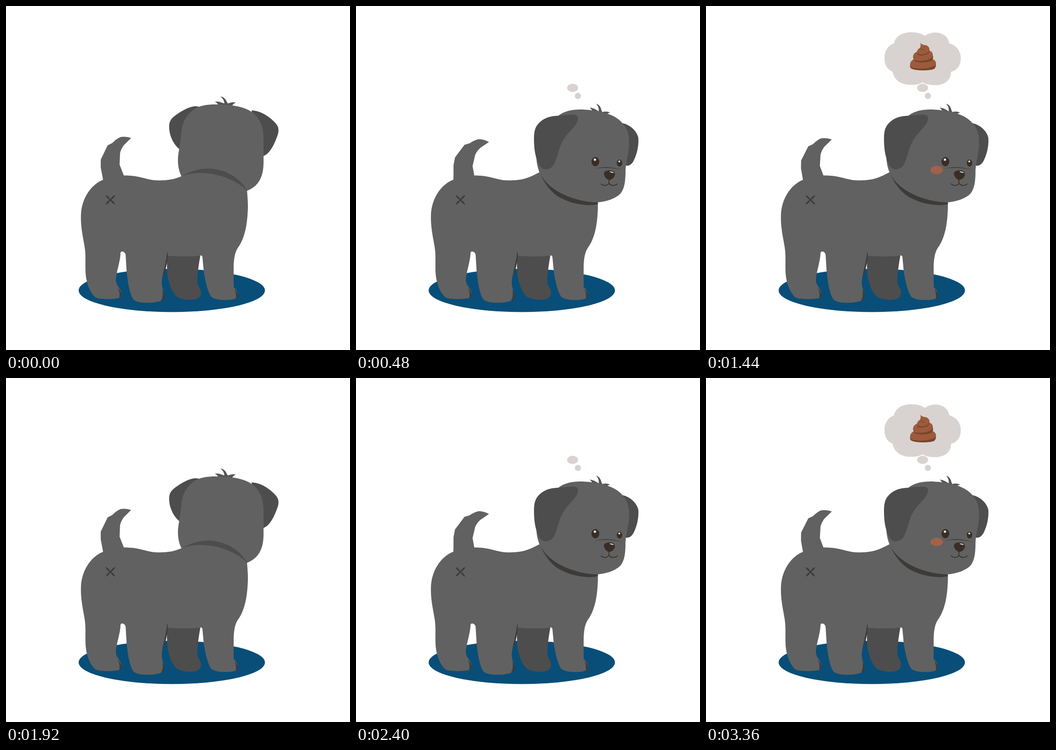
Write an HTML page that moves like this. It is 748x748 px and loops after 3840 ms.

```html
<!DOCTYPE html>
<html lang="en">
<head>
<meta charset="utf-8">
<title>Thinking puppy</title>
<style>
  html, body { margin: 0; width: 100%; height: 100%; overflow: hidden; background: #fff; }
  svg { display: block; width: 100vw; height: 100vh; }
  .fur { fill: #616161; }
  .dark { fill: #4d4d4d; }
  .deep { fill: #3d3b39; }
  .ink { fill: #382e26; }
  .cloud { fill: #d8d3d1; }
  .line { fill: none; stroke: #382e26; stroke-width: 1.7; stroke-linecap: round; }
</style>
</head>
<body>
<svg viewBox="0 0 748 748" xmlns="http://www.w3.org/2000/svg">
  <defs>
    <path id="hair" d="M454 208 Q462 207 469 210 L475 212 Q474 202 466 197 Q476 197 481 210 L483 212 Q491 208 500 210 Q494 212 491 218 L462 218 Q461 211 454 208Z"/>
    <path id="petal" d="M0 0 C-2 -6 -6 -9 -10.500 -10.500 C-9 -6 -6 -2 0 0Z"/>
  </defs>

  <ellipse cx="360.500" cy="618.500" rx="202.500" ry="47" fill="#084e78"/>

  <path id="tail" class="fur" d="M212 384 L210 372 L206 351 L206 334 L221 303 L231 298 Q241 288 249 285 Q261 283 272 287 L256 303 Q250 311 248 320 L247 345 L256 368 L258 390Z"/>

  <g id="backHead">
    <use href="#hair" fill="#555"/>
    <path class="dark" d="M419 219 C409 215 390 222 371 236 C356 246 354 254 355 267 C356 285 366 303 378 312 L400 270Z"/>
    <path class="dark" d="M534 227 C553 227 576 242 588 257 C595 266 593 276 588 288 C580 309 570 323 560 326 L540 280Z"/>
    <path class="fur" d="M382 371 C375 358 372 340 375 320 C379 300 380 286 382 268 C386 247 397 230 417 220 C435 213 459 213 489 216 C511 218 532 225 544 239 C556 253 560 269 560 291 L560 340 C560 372 549 392 524 402 L450 400Z"/>
    <path class="dark" d="M382 370 C407 356 430 352 449 354 C482 357 510 376 525 402 L440 390Z"/>
  </g>

  <path class="dark" d="M350 535 L424 535 C419 562 416 582 416 601 C416 608 423 612 424 621 C425 629 421 634 414 637 C402 641 383 638 373 633 C361 624 354 604 351 584 C350 567 349 552 350 535Z"/>
  <path class="deep" d="M351 526 C353 544 350 562 345 580 L339 592 L340 550Z"/>
  <path class="fur" d="M211 378 C232 368 257 367 280 370 C300 373 314 379 326 379 C345 380 364 378 382 370 C401 363 423 361 447 365 C478 370 503 382 524 401 C525 412 526 424 526 438 C525 474 520 504 504 526 C497 537 495 552 495 572 L495 611 C501 616 504 622 504 629 C503 636 497 638 486 639 C471 640 454 639 446 632 C438 620 433 597 430 577 L427 545 Q425 541 422 543 Q391 546 352 543 L351 527 C350 552 341 578 339 597 C337 611 344 618 344 630 C345 641 334 643 319 645 C302 646 284 645 277 638 C268 625 264 595 262 573 L260 540 Q258 535 254 534 Q250 533 249 537 C249 553 240 579 239 594 C238 606 247 612 250 620 C253 631 250 635 240 636 C225 638 204 638 195 634 C182 623 174 601 173 579 C172 561 174 542 171 524 C167 500 162 479 163 454 C164 421 183 389 211 378Z"/>
  <path class="deep" d="M243 613 Q252 621 251 630 Q249 635 246 635 Q249 624 243 613Z"/>
  <path class="deep" d="M340 616 Q347 630 344 636 Q341 640 337 641 Q343 631 340 616Z"/>
  <path class="deep" d="M497 615 Q505 624 504 630 Q504 635 500 637 Q501 626 497 615Z"/>
  <g id="star" class="deep" transform="translate(227 421.500)"></g>

  <g id="frontHead">
    <path class="fur" d="M376 373 L400 361 L416 385Z"/>
    <path class="deep" d="M398 358 L526 420 L526 431 C500 437 462 429 436 412 C419 399 406 380 398 358Z"/>
    <use href="#hair" fill="#555" transform="translate(508 221) rotate(11) translate(-454 -208)"/>
    <path class="dark" d="M573 254 C592 255 610 269 614 287 C615 305 611 322 603 338 Q596 349 587 347 L570 300Z"/>
    <path class="fur" d="M400 364 C394 350 392 338 392 320 L420 260 L442 237 C460 224 486 223 515 227 C548 231 571 242 583 259 C594 273 595 293 593 312 C591 327 587 339 586 358 C586 381 584 397 575 408 C564 419 545 425 526 427 C494 427 461 416 440 404 C421 393 407 378 400 364Z"/>
    <path class="dark" d="M445 238 L468 236 Q483 235 483 244 C482 260 463 272 453 288 C440 306 440 328 429 347 Q421 356 411 355 Q401 354 396 341 C389 326 387 307 387 289 C387 268 391 259 404 249 C416 240 430 239 445 238Z"/>
    <ellipse id="blush" cx="501.500" cy="356.500" rx="13.500" ry="9" fill="#a3614a"/>
    <path fill="#3f3d3b" d="M518 354 Q547 345 580 357 Q547 349 518 354Z"/>
    <ellipse class="ink" cx="520.500" cy="338.500" rx="8.500" ry="10"/>
    <ellipse class="ink" cx="573" cy="341.500" rx="6" ry="7.500"/>
    <circle cx="519.500" cy="334" r="2.600" fill="#eee"/>
    <circle cx="572.500" cy="338" r="2" fill="#eee"/>
    <path class="ink" d="M539 365 C539 359 546 357 552 357.500 C559 357 564 361 563 367 C562 373 556 378 551 378 C546 378 540 372 539 365Z"/>
    <path fill="#eee" d="M551 360 Q557 359 561 363 Q555 363 551 360Z"/>
    <path class="line" d="M550 377 V386 M533 387 Q542 394 550 386 Q559 394 568 387"/>
  </g>

  <circle id="dot" class="cloud" cx="482.500" cy="195.500" r="6.700"/>
  <ellipse id="puff" class="cloud" cx="471" cy="178" rx="12" ry="9"/>
  <g id="thought">
    <path class="cloud" d="M409 81 C412 65 428 57 447 57 C459 57 469 60 476 65 C484 59 494 57 503 58 C519 60 527 69 529 81 C545 86 554 98 554 113 C554 129 547 139 533 143 C533 161 519 172 499 172 C487 172 478 170 471 166 C462 171 452 172 440 171 C421 170 408 158 406 143 C394 138 388 128 388 113 C388 97 396 86 409 81Z"/>
    <path fill="#7a4429" d="M446 121 L499 121 Q502 132 496 137 Q488 140 472 140 Q454 140 446 136 Q441 131 446 121Z"/>
    <path fill="#9c5b3d" d="M451 116 Q443 121 444 129 Q444 134 454 135 Q473 138 490 133 Q500 130 500 125 Q500 118 492 115Z"/>
    <path fill="#7a4429" d="M452 110 L492 104 Q497 115 488 120 Q473 125 456 121 Q450 118 452 110Z"/>
    <path fill="#9c5b3d" d="M459 99 Q450 103 450 111 Q450 118 460 119 Q476 120 487 115 Q494 111 493 104 Q491 98 485 97Z"/>
    <path fill="#7a4429" d="M459 100 L486 94 Q487 103 478 106 Q466 110 459 105Z"/>
    <path fill="#9c5b3d" d="M466 80 Q470 85 478 85 Q486 88 486 95 Q485 102 474 105 Q461 106 459 101 Q458 95 465 91 Q468 87 466 80Z"/>
    <path fill="none" stroke="#7a4429" stroke-width="1.300" d="M467 91 Q468 95 474 96"/>
  </g>
</svg>
<script>
const $ = id => document.getElementById(id);
const STEP = 240;
const BLUSH = [0, 0, 0, 0, .5, .75, 1, 1];

// Tail poses: turn in degrees, drop in pixels
const UP = [0, 0], RIGHT = [11, 0], REST = [1, 2.5], MID = [6, 1.5];
const TAIL = [UP, UP, RIGHT, RIGHT, REST, MID, REST, REST];

$("star").innerHTML = [0, 90, 180, 270]
  .map(a => `<use href="#petal" transform="rotate(${a})"/>`).join("") + '<circle r="2.5"/>';

const show = (id, on) => $(id).setAttribute("visibility", on ? "visible" : "hidden");

function draw(ms) {
  const step = Math.floor(ms / STEP) % TAIL.length;
  const [turn, drop] = TAIL[step];
  show("backHead", step < 2);
  show("frontHead", step >= 2);
  show("dot", step >= 1);
  show("puff", step >= 2);
  show("thought", step >= 3);
  $("blush").setAttribute("opacity", BLUSH[step]);
  $("tail").setAttribute("transform", `translate(0 ${drop}) rotate(${turn} 235 380)`);
}

const start = performance.now();
function tick() {
  draw(performance.now() - start);
  requestAnimationFrame(tick);
}
draw(0);
requestAnimationFrame(tick);
</script>
</body>
</html>
```
